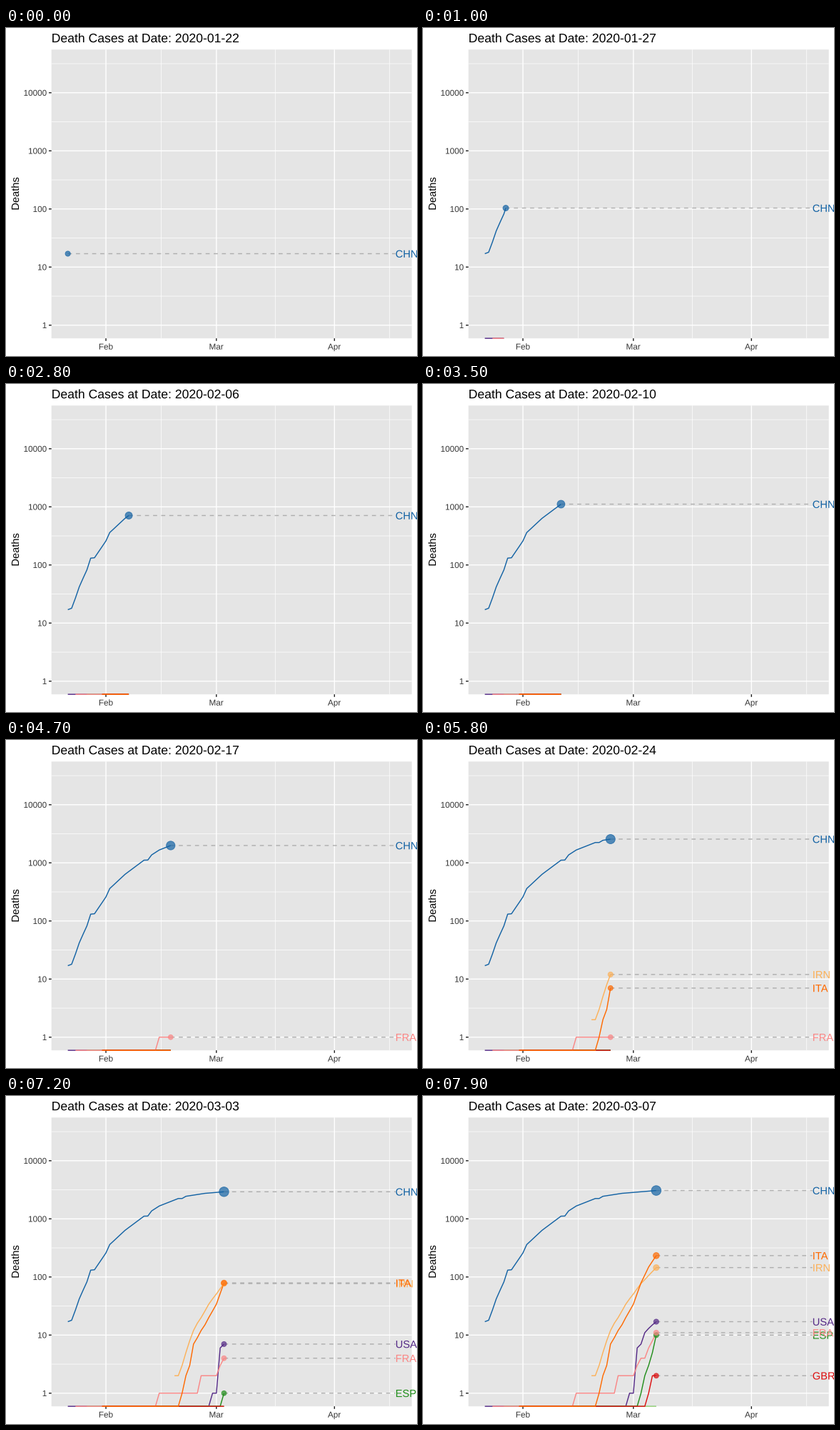
Animation, 576 px wide and 460 px high, one loop 8 s. Source, as a matplotlib script:

```python
import numpy as np
import matplotlib.pyplot as plt
from matplotlib.animation import FuncAnimation
from matplotlib.patches import Circle, PathPatch, Rectangle
from matplotlib.textpath import TextPath
from matplotlib.transforms import Affine2D

W, H, DPI = 576, 460, 64
PT = 72 / DPI  # pixels to points
FRAMES, INTERVAL = 80, 100
LAST_DAY, LAST_STEP = 85, 149  # whole reveal: days and animation steps
START = np.datetime64("2020-01-22")

LEFT, RIGHT, TOP, BOTTOM = 63.7, 568.67, 30.2, 435.2
DAY_W = (RIGHT - LEFT) / 1.1 / 86
X0 = LEFT + 0.05 * 86 * DAY_W
MAX_DEATHS = 32916
DECADE = (BOTTOM - TOP) / 1.1 / np.log10(MAX_DEATHS)
Y_ONE = BOTTOM - 0.05 * (BOTTOM - TOP) / 1.1
LABEL_X = X0 + 86 * DAY_W
LINE = 1.42
GREY, DARK, TICK = "#e5e5e5", "#363636", "#1f1f1f"

# In drawing order: code, palette slot, first day, {day: deaths} turning
# points; growth between them is geometric, and zero before the first.
COUNTRIES = [
    ("BEL", 0, 13, {}),
    ("USA", 9, 0, {38: 1, 39: 1, 40: 6, 41: 7, 42: 11, 45: 17}),
    ("CHN", 1, 0, {0: 17, 1: 18, 3: 42, 5: 82, 6: 131, 7: 133, 10: 259,
                   11: 361, 15: 633, 20: 1112, 21: 1117, 22: 1369, 24: 1663,
                   29: 2238, 30: 2238, 31: 2443, 36: 2746, 45: 3072}),
    ("DEU", 2, 5, {}),
    ("ESP", 3, 10, {41: 1, 43: 3, 45: 10}),
    ("FRA", 4, 2, {24: 1, 34: 1, 35: 2, 39: 2, 41: 4, 42: 4, 45: 11}),
    ("GBR", 5, 9, {43: 1, 44: 2}),
    ("IRN", 6, 28, {28: 2, 29: 2, 31: 5, 33: 12, 37: 34, 41: 77, 45: 145}),
    ("ITA", 7, 9, {30: 1, 32: 3, 33: 7, 39: 34, 41: 79, 43: 148, 45: 233}),
]

plt.rcParams.update({
    "font.family": "Liberation Sans",
    "path.snap": False,
    "lines.solid_capstyle": "butt",
    "lines.solid_joinstyle": "round",
})

PALETTE = np.array(plt.get_cmap("Paired").colors) ** 1.27
DAYS = np.arange(LAST_DAY + 1)
# Each day starts on a whole animation step
KNOTS = np.round(DAYS * LAST_STEP / LAST_DAY).astype(int)


def px(day):
    return X0 + day * DAY_W


def py(log_deaths):
    return np.where(np.isneginf(log_deaths), BOTTOM, Y_ONE - log_deaths * DECADE)


def radius(deaths):
    size = 2 + 8 * np.sqrt(deaths / MAX_DEATHS)
    return 0.375 * (size * 72.27 / 25.4 + 0.945) * 96 / 72


def log_curve(points):
    """Log10 of whole deaths for every day, -inf while there are none."""
    if not points:
        return np.full(len(DAYS), -np.inf)
    logs = np.interp(DAYS, list(points), np.log10(list(points.values())))
    logs = np.log10(np.round(10 ** logs))
    return np.where(DAYS < min(points), -np.inf, logs)


fig = plt.figure(figsize=(W / DPI, H / DPI), dpi=DPI, facecolor="white")
ax = fig.add_axes([0, 0, 1, 1])
ax.set_xlim(0, W)
ax.set_ylim(H, 0)
ax.axis("off")


def rule(xs, ys, color="white", width=LINE, z=1, **kw):
    return ax.plot(xs, ys, color=color, lw=width * PT, zorder=z, **kw)[0]


class Label:
    """Outline text, so that it can sit between whole pixels."""

    def __init__(self, x, y, text, size, color="black", align=0, angle=0, z=5):
        self.size, self.align, self.angle = size, align, angle
        self.patch = ax.add_patch(PathPatch(TextPath((0, 0), "-"), lw=0,
                                            facecolor=color, zorder=z))
        self.set_text(text)
        self.move(x, y)

    def set_text(self, text):
        path = TextPath((0, 0), text, size=self.size)
        self.shift = -self.align * path.get_extents().x1
        self.patch.set_path(path)

    def move(self, x, y):
        place = Affine2D().translate(self.shift, 0).rotate_deg(self.angle)
        self.patch.set_transform(place.scale(1, -1).translate(x, y) + ax.transData)


def draw_panel():
    ax.add_patch(Rectangle((LEFT, TOP), RIGHT - LEFT, BOTTOM - TOP,
                           facecolor=GREY, lw=0, zorder=0))
    for power in np.arange(0.5, 5):
        rule([LEFT, RIGHT], [py(power)] * 2, width=LINE / 2)
    for day in (24.5, 54.5, 84.5):
        rule([px(day)] * 2, [TOP, BOTTOM], width=LINE / 2)
    for power in range(5):
        y = py(power)
        rule([LEFT, RIGHT], [y, y])
        rule([LEFT - 3.67, LEFT], [y, y], TICK)
        Label(LEFT - 7, y + 4.2, str(10 ** power), 11.73, DARK, align=1)
    for day, month in ((10, "Feb"), (39, "Mar"), (70, "Apr")):
        x = px(day)
        rule([x, x], [TOP, BOTTOM])
        rule([x, x], [BOTTOM, BOTTOM + 3.67], TICK)
        Label(x - 0.3, 450.8, month, 11.73, DARK, align=0.5)
    Label(18, (TOP + BOTTOM) / 2, "Deaths", 14.67, align=0.5, angle=90)


class Country:
    def __init__(self, code, slot, first, points):
        color = PALETTE[slot]
        self.first, self.logs = first, log_curve(points)
        self.path = rule([], [], color, z=2)
        self.lead = rule([], [], "#aeaeae", z=3, linestyle=(0, (4, 4)))
        self.dot = ax.add_patch(Circle((0, 0), 1, color=color, alpha=0.7,
                                       lw=0.945 * PT, zorder=4))
        self.label = Label(LABEL_X, 0, code, 14.7, color)

    def show(self, day, part):
        span = slice(self.first, day + 1)
        days, logs = DAYS[span], self.logs[span]
        head = logs[-1] if len(logs) else -np.inf
        alive = bool(np.isfinite(head))
        if part and alive:
            head += part * (self.logs[day + 1] - head)
            days, logs = np.append(days, day + part), np.append(logs, head)
        self.path.set_data(px(days), py(logs))

        for artist in (self.lead, self.dot, self.label.patch):
            artist.set_visible(alive)
        if alive:
            x, y = px(day + part), float(py(head))
            self.lead.set_data([x, LABEL_X], [y, y])
            self.dot.center = x, y
            self.dot.set_radius(radius(10 ** head))
            self.label.move(LABEL_X, y + 5.3)


draw_panel()
title = Label(LEFT, 20.1, str(START), 17.6)
countries = [Country(*row) for row in COUNTRIES]


def update(step):
    day = int(np.searchsorted(KNOTS, step, "right")) - 1
    part = (step - KNOTS[day]) / (KNOTS[day + 1] - KNOTS[day])
    date = START + int(step * LAST_DAY / LAST_STEP)
    title.set_text(f"Death Cases at Date: {date}")
    for country in countries:
        country.show(day, part)
    return []


anim = FuncAnimation(fig, update, frames=FRAMES, interval=INTERVAL,
                     repeat=True, repeat_delay=0, blit=False)
plt.show()
```
